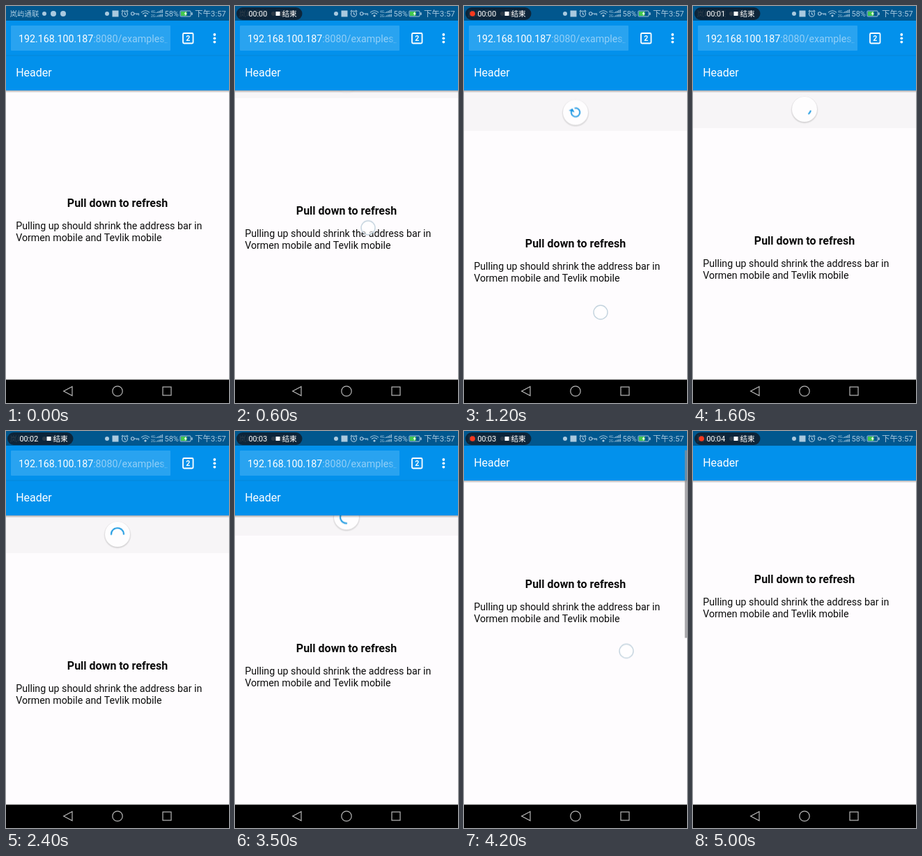
An HTML page for the animation above (5.1 s loop, 320x569 px).

```html
<!DOCTYPE html>
<html lang="en">
<head>
<meta charset="utf-8">
<title>Pull down to refresh</title>
<style>
html, body { margin: 0; height: 100%; overflow: hidden; background: #000; }
svg { display: block; }
#stage { width: 100vw; height: 100vh; font-family: Roboto, "Noto Sans CJK SC", "Noto Sans CJK", sans-serif; }
.body { font-size: 14.22px; fill: #0c0c0c; }
.title { font-size: 16px; font-weight: 700; fill: #0c0c0c; }
.cjk { font-family: "Noto Sans CJK SC", "Noto Sans CJK", sans-serif; }
.line { fill: none; stroke: currentColor; }

.loop { animation: 5.1s linear infinite; }
#scroll { animation-name: scroll; }
#pull { animation-name: pull; }
#bars { animation-name: hide-bars; }
#ball { animation-name: ball; }
#arrow { animation-name: arrow; }
#arrow-box { animation-name: arrow-show; animation-timing-function: step-end; }
#spin { animation-name: spin; }
#arc { animation-name: arc; }
#touch { animation-name: touch-move; }
#touch-ring { animation-name: touch-show; animation-timing-function: step-end; }
#thumb { animation-name: thumb; }
#pill { animation-name: pill; animation-timing-function: step-end; }
#rec { animation-name: rec; animation-timing-function: step-end; }
#digits { animation-name: digits; animation-timing-function: step-end; }

@keyframes pull {
  0%, 9.8% { transform: translateY(0); }
  17.65% { transform: translateY(43.3px); }
  22.55%, 24.51% { transform: translateY(58px); animation-timing-function: ease-out; }
  29.41%, 64.9% { transform: translateY(53.5px); animation-timing-function: ease-in-out; }
  72.75%, 100% { transform: translateY(0); }
}
@keyframes scroll {
  0%, 74.51% { transform: translateY(0); }
  82.35% { transform: translateY(-63px); animation-timing-function: ease-out; }
  86.27%, 100% { transform: translateY(-70px); }
}
@keyframes hide-bars {
  0%, 74.51% { transform: translateY(0); }
  80.86%, 100% { transform: translateY(-50px); }
}
@keyframes ball {
  0%, 9.8% { opacity: 0; }
  17.65% { opacity: .6; }
  22.55%, 100% { opacity: 1; }
}
@keyframes arrow {
  0%, 9.8% { transform: rotate(0); }
  17.65% { transform: rotate(180deg); }
  22.55%, 100% { transform: rotate(240deg); }
}
@keyframes arrow-show { 0% { opacity: 1; } 27.45%, 100% { opacity: 0; } }
@keyframes spin {
  0%, 27.45% { transform: rotate(-30deg); }
  86.27%, 100% { transform: rotate(510deg); }
}
@keyframes arc {
  0%, 27.44% { stroke-dasharray: 3 360; stroke-dashoffset: 0; opacity: 0; }
  27.45% { stroke-dasharray: 3 360; stroke-dashoffset: 0; opacity: 1; }
  56.86% { stroke-dasharray: 283 360; stroke-dashoffset: -36; animation-timing-function: ease-in; }
  86.27%, 100% { stroke-dasharray: 3 360; stroke-dashoffset: -316; opacity: 1; }
}
@keyframes touch-move {
  0%, 9.8% { transform: translate(190px, 290px); }
  17.65% { transform: translate(194px, 400px); }
  22.55%, 24.51% { transform: translate(196px, 439px); }
  73.5%, 74.51% { transform: translate(235px, 378px); }
  82.35% { transform: translate(233px, 315.5px); }
  84%, 100% { transform: translate(232px, 308px); }
}
@keyframes touch-show {
  0% { opacity: 0; }
  9.8% { opacity: 1; }
  24.51% { opacity: 0; }
  73.5% { opacity: 1; }
  83.8%, 100% { opacity: 0; }
}
@keyframes thumb {
  0%, 74.51% { transform: translateY(0); opacity: 0; }
  76.4% { opacity: 1; }
  80.86% { transform: translateY(0); }
  82.35% { transform: translateY(6.5px); animation-timing-function: ease-out; }
  86.27%, 93% { transform: translateY(10px); opacity: 1; }
  97.5%, 100% { transform: translateY(10px); opacity: 0; }
}
@keyframes pill { 0% { opacity: 0; } 1.95%, 100% { opacity: 1; } }
@keyframes rec {
  0%, 15.68%, 35.29%, 54.9%, 74.5%, 94.11%, 100% { opacity: 1; }
  5.88%, 25.49%, 45.09%, 64.7%, 84.31% { opacity: 0; }
}
@keyframes digits {
  0% { transform: translateY(0); }
  25.49% { transform: translateY(-20px); }
  45.09% { transform: translateY(-40px); }
  64.7% { transform: translateY(-60px); }
  84.31%, 100% { transform: translateY(-80px); }
}
</style>
</head>
<body>
<svg id="stage" viewBox="0 0 320 569">
  <defs>
    <linearGradient id="shade" x2="0" y2="1">
      <stop stop-color="#000" stop-opacity=".3"/>
      <stop offset="1" stop-color="#000" stop-opacity="0"/>
    </linearGradient>
    <linearGradient id="fade">
      <stop stop-color="#29a3f0" stop-opacity="0"/>
      <stop offset="1" stop-color="#29a3f0"/>
    </linearGradient>
    <radialGradient id="glow">
      <stop offset=".82" stop-color="#000" stop-opacity=".2"/>
      <stop offset="1" stop-color="#000" stop-opacity="0"/>
    </radialGradient>
  </defs>
  <rect width="320" height="569" fill="#fefcfe"/>

  <!-- page -->
  <g id="scroll" class="loop">
    <g id="pull" class="loop">
      <rect y="40" width="320" height="81" fill="#f7f5f7"/>
      <g transform="translate(160 94.5)">
        <g id="ball" class="loop">
          <circle cy="1" r="20" fill="url(#glow)"/>
          <circle r="18" fill="#fefdfe"/>
          <g id="arrow-box" class="loop">
            <g id="arrow" class="loop">
              <path transform="scale(.889) translate(-12 -12)" fill="#1996e3" d="M17.65 6.35A8 8 0 1 0 19.73 14H17.65A6 6 0 1 1 16.22 7.78L13 11H20V4Z"/>
            </g>
          </g>
          <g id="spin" class="loop">
            <circle id="arc" class="loop line" color="#1496e0" r="9" pathLength="360" stroke-width="2"/>
          </g>
        </g>
      </g>
      <text class="title" x="160" y="288" text-anchor="middle">Pull down to refresh</text>
      <text class="body" x="14.2" y="320">Pulling up should shrink the address bar in</text>
      <text class="body" x="14.2" y="337">Vormen mobile and Tevlik mobile</text>
    </g>
  </g>

  <g id="touch" class="loop">
    <circle id="touch-ring" class="loop" r="10" fill="#fff" fill-opacity=".6" stroke="#c3d3de" stroke-width="1.4"/>
  </g>

  <!-- address bar and header -->
  <g id="bars" class="loop">
    <rect y="121" width="320" height="3.5" fill="url(#shade)"/>
    <rect y="20" width="320" height="101" fill="#0291ec"/>
    <rect y="70.5" width="320" height="1" fill="#0687d7"/>
    <rect x="7" y="28" width="229" height="36" rx="1" fill="#29a3f0"/>
    <svg x="7" y="28" width="225" height="36">
      <text x="11" y="24" font-size="14.22" fill="#fff">192.168.100.187<tspan fill="#92cff7">:8080/examples_</tspan></text>
    </svg>
    <rect x="220" y="30" width="14" height="32" fill="url(#fade)"/>
    <rect x="254" y="39" width="14.5" height="14.5" rx="1.5" fill="none" stroke="#fff" stroke-width="1.8"/>
    <text x="261.2" y="50" font-size="10.5" font-weight="700" fill="#fff" text-anchor="middle">2</text>
    <g fill="#fff">
      <circle cx="299.3" cy="41" r="1.9"/><circle cx="299.3" cy="46.3" r="1.9"/><circle cx="299.3" cy="51.6" r="1.9"/>
    </g>
    <text x="14.2" y="101" font-size="16" fill="#fff">Header</text>
  </g>

  <rect id="thumb" class="loop" x="316.8" y="21" width="3.2" height="269" fill="#8c8c90" fill-opacity=".75"/>

  <!-- status bar -->
  <rect width="320" height="21" fill="#01578e"/>
  <g color="#a9c9df" fill="#a9c9df">
    <text class="cjk" x="5.5" y="14.7" font-size="10.5">岚屿通联</text>
    <circle cx="55" cy="11" r="3"/>
    <circle cx="68" cy="11" r="4"/>
    <circle cx="82" cy="11" r="4"/>
    <circle cx="145" cy="11" r="3"/>
    <rect x="152.5" y="6.5" width="9" height="9"/>
    <g class="line" stroke-width="1.1">
      <circle cx="170.5" cy="11.2" r="4"/>
      <path d="M170.5 8.8v2.8l1.8 1M165.8 8l2.2-2M175.2 8l-2.2-2"/>
      <circle cx="181.7" cy="11" r="2.2"/>
      <path d="M184 11h6.5v2.4M188 11v2"/>
      <path d="M194 9.3q6-5 12 0M196 11.5q4-3.4 8 0"/>
    </g>
    <circle cx="200" cy="14" r="1.6"/>
    <text x="208" y="10" font-size="5">4G</text>
    <text x="208" y="15.5" font-size="5">2G</text>
    <path class="line" stroke-width="1.2" d="M215.5 10v-1M217.7 10v-2M219.9 10v-3M222.1 10v-4M224.3 10v-5M215.5 15.5v-1M217.7 15.5v-2M219.9 15.5v-3M222.1 15.5v-3.6M224.3 15.5v-4"/>
    <text x="227.5" y="14.8" font-size="11">58%</text>
    <rect class="line" x="250" y="7" width="15" height="8" rx="1"/>
    <rect x="266" y="9.3" width="1.6" height="3.6"/>
    <rect x="251" y="8" width="8.5" height="6" fill="#42c94e"/>
    <path fill="#fff" d="M258.5 7.5l-3 4h2l-1 3 3.5-4h-2Z"/>
    <text x="271" y="14.8" font-size="11.4">下午3:57</text>
  </g>

  <!-- recorder -->
  <g id="pill" class="loop">
    <rect x="2" y="2" width="94.5" height="18" rx="9" fill="#101b28" fill-opacity=".82"/>
    <circle id="rec" class="loop" cx="12.2" cy="11" r="3.8" fill="#f8391f"/>
    <g fill="#fff" font-size="10.7">
      <text x="19.5" y="14.8">00:0</text>
      <svg x="40.3" y="2" width="8" height="18">
        <g id="digits" class="loop">
          <text y="12.8">0</text><text y="32.8">1</text><text y="52.8">2</text><text y="72.8">3</text><text y="92.8">4</text>
        </g>
      </svg>
      <rect x="58.5" y="8" width="6" height="6"/>
      <text class="cjk" x="67.7" y="14.8" font-size="10.5">结束</text>
    </g>
  </g>

  <!-- navigation -->
  <rect y="535.5" width="320" height="33.5"/>
  <g class="line" color="#b9b9b9" stroke-width="1.2">
    <path d="M95 545.5v13L82.7 552Z"/>
    <circle cx="160" cy="552" r="7.2"/>
    <rect x="225" y="546" width="12" height="12"/>
  </g>
</svg>
</body>
</html>
```
